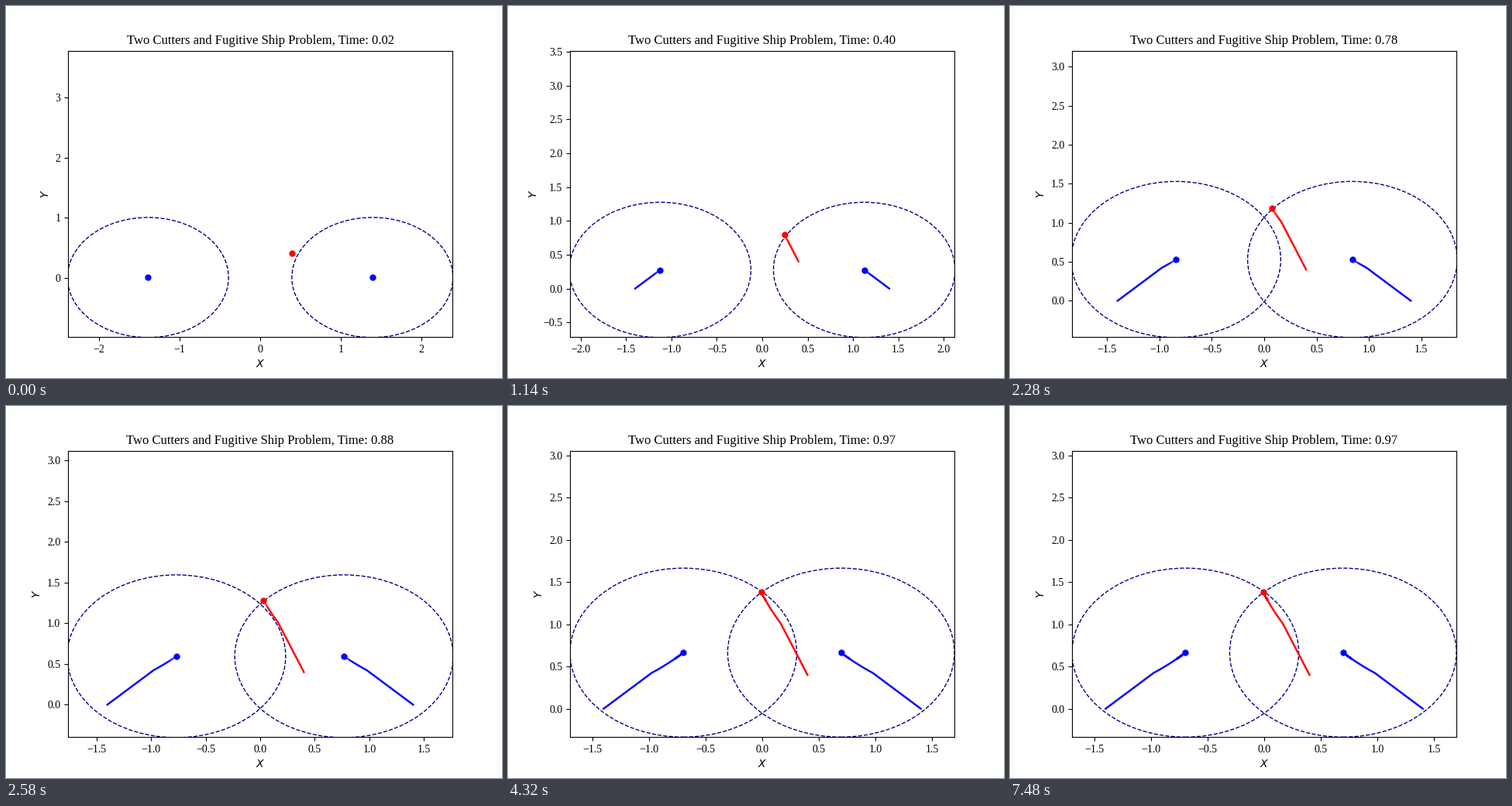
Recreate the animation shown at these times as a matplotlib script. Size 640 by 480 pixels, loop 7.51 s.

```python
import numpy as np
import matplotlib.pyplot as plt
from matplotlib.animation import FuncAnimation
from matplotlib.collections import LineCollection
from matplotlib.patches import Circle

plt.rcParams["font.family"] = "Liberation Serif"

LOOP_MS = 7510
FRAMES = 251
DT = 0.01
SHIP_SPEED = 1.1
STRAIGHT_STEPS = 60
STEPS = 97
TAIL = 10


def unit(deg):
    a = np.radians(deg)
    return np.array([np.cos(a), np.sin(a)])


def simulate():
    """Paths of the right cutter and the ship; the left cutter mirrors the right."""
    cutter, ship = np.array([1.4, 0.0]), np.array([0.4, 0.4])
    cutters, ships = [cutter], [ship]
    side = np.sqrt(SHIP_SPEED**2 - 1)
    for step in range(STEPS):
        if step < STRAIGHT_STEPS:
            v_cutter, v_ship = unit(135), SHIP_SPEED * unit(111.2)
        else:
            # the cutter chases; the ship holds its distance and slides sideways
            v_cutter = (ship - cutter) / np.hypot(*(ship - cutter))
            v_ship = v_cutter + side * np.array([v_cutter[1], -v_cutter[0]])
        cutter, ship = cutter + DT * v_cutter, ship + DT * v_ship
        cutters.append(cutter)
        ships.append(ship)
    return np.array(cutters), np.array(ships)


right, ship = simulate()
left = right * [-1, 1]
paths = [left, right, ship]
colors = ["blue", "blue", "red"]

fig, ax = plt.subplots(figsize=(6.4, 4.8), dpi=100)
ax.set_xlabel("$X$")
ax.set_ylabel("$Y$")
title = ax.set_title("")

rings = [ax.add_patch(Circle((0, 0), 1, fill=False, ls="--", lw=1, ec="darkblue"))
         for _ in range(2)]
trail = LineCollection([], linewidths=1.5, alpha=0.22, zorder=2,
                       capstyle="projecting", joinstyle="round")
ax.add_collection(trail, autolim=False)
dots = [ax.plot([], [], "o", ms=5, color=c, zorder=3)[0] for c in colors]


def drawn_step(k):
    return min(k + 1, STEPS)


def update(k):
    # the view and the clock run one step ahead of the drawn positions
    ahead = min(k + 2, STEPS)
    x, y = right[ahead]
    half = x + 1
    ax.set_xlim(-half, half)
    ax.set_ylim(y - 1, y - 1 + 2 * half)
    title.set_text(f"Two Cutters and Fugitive Ship Problem, Time: {ahead * DT:.2f}")

    n = drawn_step(k)
    for ring, path in zip(rings, paths):
        ring.center = tuple(path[n])
    for dot, path in zip(dots, paths):
        dot.set_data([path[n, 0]], [path[n, 1]])

    # translucent tails pile up, one layer per elapsed frame
    ends = [drawn_step(i) for i in range(k + 1)]
    trail.set_segments([p[max(0, e - TAIL):e + 1] for e in ends for p in paths])
    trail.set_color(colors * len(ends))
    return [title, trail, *rings, *dots]


anim = FuncAnimation(fig, update, frames=FRAMES, interval=LOOP_MS / FRAMES,
                     repeat=True, repeat_delay=0, blit=False)
plt.show()
```
